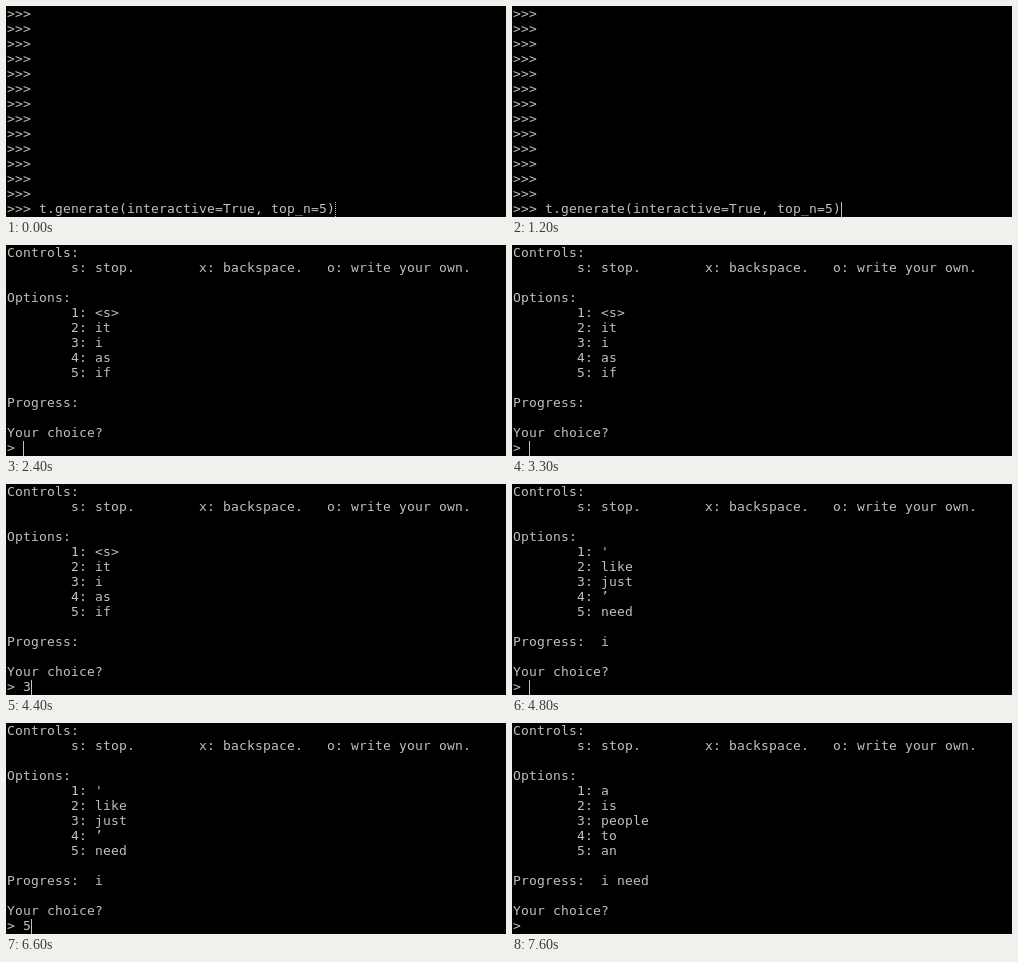
An HTML page with a canvas for the animation above (8 s loop, 500x211 px).

```html
<!DOCTYPE html>
<html lang="en">
<head>
<meta charset="utf-8">
<title>Terminal session</title>
<style>
  html, body { margin: 0; width: 500px; height: 211px; overflow: hidden; background: #000; }
  canvas { display: block; }
</style>
</head>
<body>
<canvas id="stage" width="500" height="211"></canvas>
<script>
const ctx = document.getElementById('stage').getContext('2d', { alpha: false });
const LOOP = 8000;
const CELL = 8, LINE = 15, LEFT = 1, TOP = 1, BASE = 11;
const LAST_ROW = 13;
const INK = '#c0c0c0';

const prompts = Array(LAST_ROW).fill('>>>');
const shell = [...prompts, '>>> t.generate(interactive=True, top_n=5)'];

function menu(options, progress, typed) {
  const indent = ' '.repeat(8);
  return [
    'Controls:',
    indent + 's: stop.'.padEnd(16) + 'x: backspace.'.padEnd(16) + 'o: write your own.',
    '',
    'Options:',
    ...options.map((word, i) => `${indent}${i + 1}: ${word}`),
    '',
    'Progress:  ' + progress,
    '',
    'Your choice?',
    '> ' + typed
  ];
}

const first = ['<s>', 'it', 'i', 'as', 'if'];
const second = ["'", 'like', 'just', '\u2019', 'need'];
const third = ['a', 'is', 'people', 'to', 'an'];

const screens = [
  [0, shell],
  [2400, menu(first, '', '')],
  [4400, menu(first, '', '3')],
  [4800, menu(second, 'i', '')],
  [6600, menu(second, 'i', '5')],
  [7100, menu(third, 'i need', '')]
];

const cursor = [
  [0, 'dotted'], [200, 'solid'], [700, 'off'], [1200, 'solid'], [1700, 'off'],
  [2100, 'solid'], [2900, 'off'], [3300, 'solid'], [3800, 'off'],
  [4300, 'solid'], [5300, 'off'], [5800, 'solid'], [6200, 'off'],
  [6600, 'solid'], [7600, 'off']
];

function valueAt(track, t) {
  let value = track[0][1];
  for (const [start, next] of track) if (t >= start) value = next;
  return value;
}

function drawLine(text, row) {
  [...text].forEach((ch, col) => {
    if (ch !== ' ') ctx.fillText(ch, LEFT + col * CELL, TOP + row * LINE + BASE);
  });
}

function drawCursor(col, style) {
  if (style === 'off') return;
  const step = style === 'dotted' ? 2 : 1;
  for (let y = 0; y < LINE; y += step) {
    ctx.fillRect(LEFT + col * CELL, TOP + LAST_ROW * LINE + y, 1, 1);
  }
}

function draw(t) {
  const lines = valueAt(screens, t);
  ctx.fillStyle = '#000';
  ctx.fillRect(0, 0, 500, 211);
  ctx.fillStyle = INK;
  ctx.font = '13px "DejaVu Sans Mono", monospace';
  ctx.textBaseline = 'alphabetic';
  lines.forEach(drawLine);
  drawCursor(lines[LAST_ROW].length, valueAt(cursor, t));
}

const start = performance.now();
function tick() {
  draw((performance.now() - start) % LOOP);
  requestAnimationFrame(tick);
}
tick();
</script>
</body>
</html>
```
